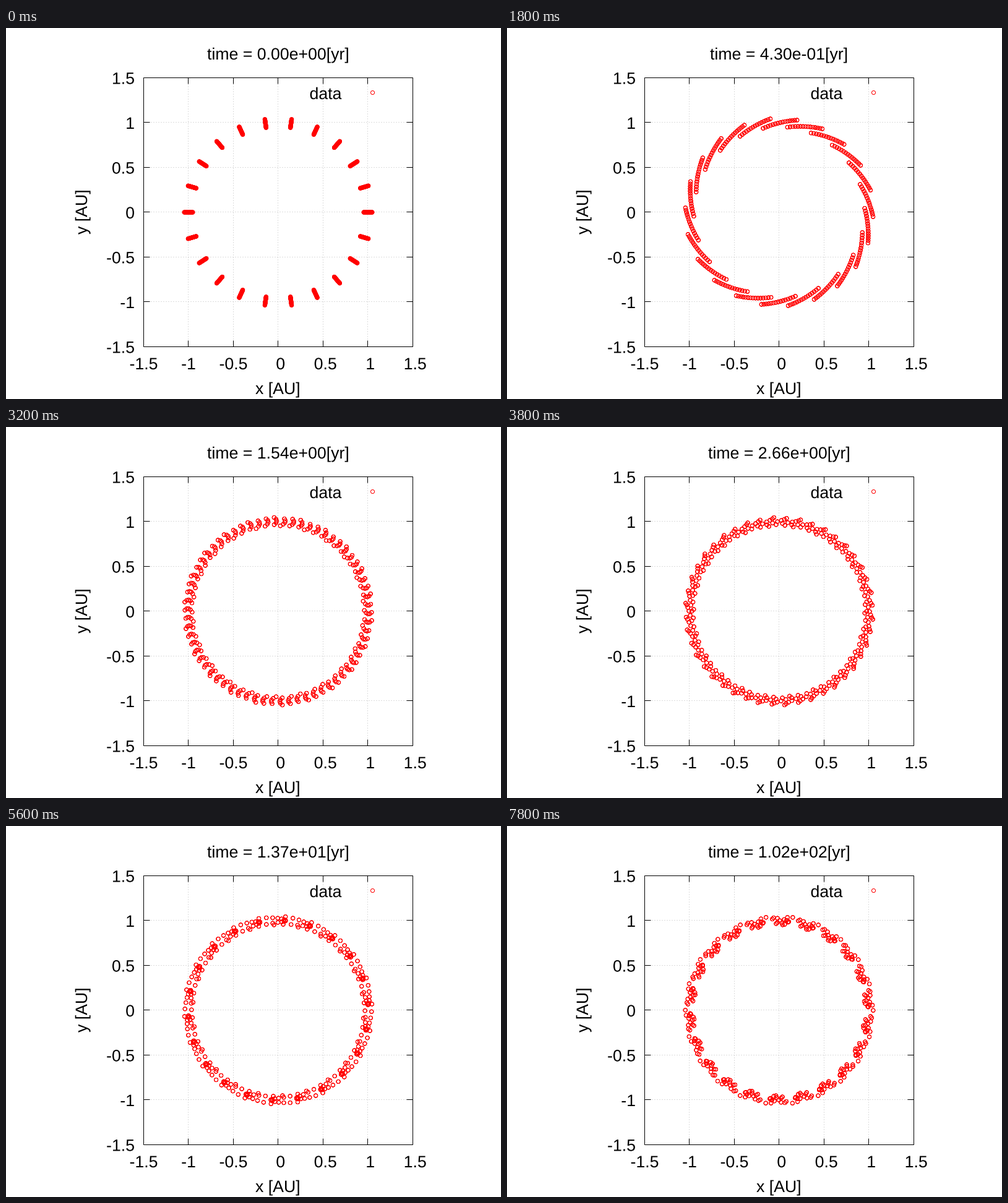
A matplotlib script for the animation above (8000 ms loop, 800x600 px).

```python
import numpy as np
import matplotlib.pyplot as plt
from matplotlib.animation import FuncAnimation
from matplotlib.collections import LineCollection
from matplotlib.patches import PathPatch, Rectangle
from matplotlib.textpath import TextPath
from matplotlib.transforms import Affine2D

W, H, DPI = 800, 600, 100
PX = 72 / DPI                    # points per pixel
EM = 80 / 3                      # font size in pixels
CX, CY, UNIT = 440, 298, 145     # plot centre and pixels per AU
L, R, T, B = 222.5, 657.5, 80.5, 515.5
TICK = 10
FRAMES, INTERVAL = 40, 200
ARMS, RINGS = 22, 15

plt.rcParams["font.family"] = "Liberation Sans"

fig = plt.figure(figsize=(W / DPI, H / DPI), dpi=DPI, facecolor="white")
ax = fig.add_axes([0, 0, 1, 1])
ax.set_xlim(0, W)
ax.set_ylim(H, 0)
ax.axis("off")


def text_path(x, y, s, turn=0):
    """Outline of s with its baseline starting exactly at pixel (x, y)."""
    place = Affine2D().scale(1, -1).rotate_deg(-turn).translate(x, y)
    return place.transform_path(TextPath((0, 0), s, size=EM))


def label(x, y, s, turn=0):
    patch = PathPatch(text_path(x, y, s, turn), fc="black", lw=0, snap=False)
    return ax.add_patch(patch)


def line(xs, ys, color="black", **kw):
    ax.plot(xs, ys, color=color, lw=PX, solid_capstyle="butt", snap=False, **kw)


def advance(s):
    return EM * sum({"-": 0.333, ".": 0.278, " ": 0.278}.get(c, 0.556) for c in s)


def tick_label(v, x, y, align):
    s = f"{v: g}"
    x -= advance(s) * align
    if s[0] == " ":
        x += advance(" ")
    label(x, y, s.strip())


def crisp(v):
    return np.floor(v - 0.5) + 0.5


def draw_axes():
    dots = dict(color="#bcbcbc", linestyle=(0, (1, 3)), zorder=1)
    for v in np.arange(-1.5, 1.6, 0.5):
        x, y = CX + v * UNIT, CY - v * UNIT
        tick_label(v, x, 552, 0.5)
        tick_label(v, 208, y + 10, 1)
        if abs(v) == 1.5:
            continue
        x, y = crisp(x), crisp(y)
        line([x, x], [B, T], **dots)
        line([L, R], [y, y], **dots)
        for edge, step in ((B, -TICK), (T, TICK)):
            line([x, x], [edge, edge + step])
        for edge, step in ((L, TICK), (R, -TICK)):
            line([edge, edge + step], [y, y])
    ax.add_patch(Rectangle((L, T), R - L, B - T, fill=False, ec="black",
                           lw=PX, snap=False, zorder=5))
    label(403, 592, "x [AU]")
    label(131, 334, "y [AU]", 90)
    label(490.5, 115, "data")


turn = np.linspace(0, 2 * np.pi, 25)
ring = 3.05 * np.column_stack([np.cos(turn), np.sin(turn)])


def circles(x, y):
    return np.column_stack([x, y])[:, None, :] + ring


def red_rings(segments):
    rings = LineCollection(segments, colors="red", linewidths=PX, zorder=4)
    return ax.add_collection(rings, autolim=False)


draw_axes()
red_rings(circles([592.5], [104.5]))
bodies = red_rings([])
title = label(325, 51, "time")

# Circular Kepler orbits on a narrow ring around 1 AU
radius = 0.95 + 0.1 * (np.arange(RINGS) + 0.5) / RINGS
start = 2 * np.pi * np.arange(ARMS) / ARMS
rr, th = (g.ravel() for g in np.meshgrid(radius, start))
omega = 2 * np.pi * rr ** -1.5


def update(i):
    t = 0.1 * 1.2 ** (i - 1) if i else 0.0
    a = th + omega * t
    rings = circles(CX + UNIT * rr * np.cos(a), CY - UNIT * rr * np.sin(a))
    # overplotting gives the bodies their firm outline
    bodies.set_segments(np.repeat(rings, 3, axis=0))
    s = f"time = {t:.2e}[yr]"
    title.set_path(text_path(328 if "e-" in s else 325, 51, s))
    return bodies, title


anim = FuncAnimation(fig, update, frames=FRAMES, interval=INTERVAL,
                     init_func=lambda: update(0), repeat=True, repeat_delay=0)
plt.show()
```
